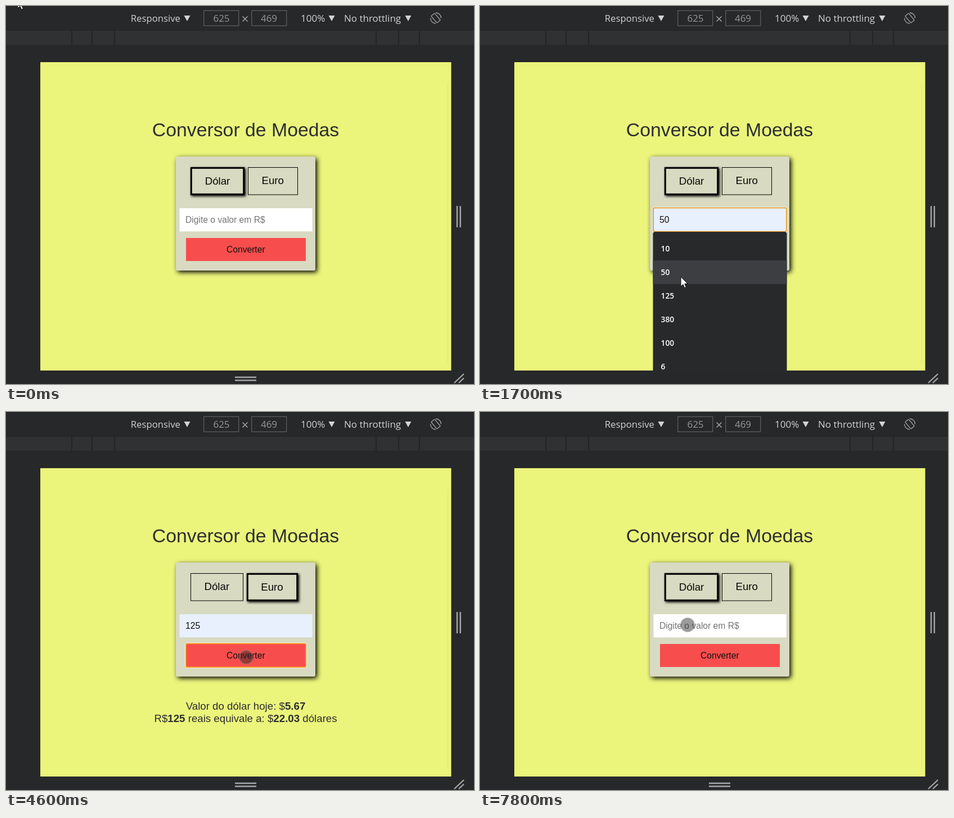
Recreate the animation shown at these times as an HTML page. Size 832 px wide and 673 px high, loop 8 s.

```html
<!DOCTYPE html>
<html lang="pt-BR">
<head>
<meta charset="utf-8">
<title>Conversor de Moedas</title>
<style>
  html, body { margin: 0; width: 100%; height: 100%; overflow: hidden; background: #272829; }
  svg { display: block; width: 832px; height: 673px; }
  text { white-space: pre; }
  .page { font-family: "Liberation Sans", Arial, sans-serif; fill: #2d2e31; }
  .ui { font-family: "Open Sans", "Noto Sans", sans-serif; fill: #d2d3d5; font-size: 17px; }
  .mid { text-anchor: middle; }
  .label { font-size: 18.7px; fill: #080808; }
  .small { font-size: 15.65px; fill: #111; }
  .result { font-size: 18.7px; }
  .result tspan { font-weight: bold; }
  .card { fill: #d8dac1; filter: drop-shadow(3px 3px 4.3px #000); }
  .option { fill: #d8dac1; stroke: #000; }
  .option.on { stroke-width: 3; filter: drop-shadow(2px 2px 2px #000); }
  .ring { fill: none; stroke: #e8981c; stroke-width: 1.6; }
  .glow { fill: none; stroke: #fff; stroke-opacity: .6; }
  .grip { stroke: #a6a7a9; stroke-width: 2.4; }
</style>
</head>
<body>
<svg viewBox="0 0 832 673">
  <defs>
    <clipPath id="viewport"><rect x="61" y="100" width="730.5" height="549"/></clipPath>
    <path id="arrowhead" d="M-5.5-5h11L0 5z" fill="#d2d3d5"/>
  </defs>

  <!-- device toolbar and ruler -->
  <rect width="832" height="673" fill="#272829"/>
  <rect width="832" height="1" fill="#1d1e1f"/>
  <rect y="43" width="832" height="26" fill="#303132"/>
  <path d="M0 43.5H832" stroke="#222324"/>
  <path d="M117 44v25M153 44v25M193 44v25M658 44v25M698 44v25M735 44v25" stroke="#242526" stroke-width="2"/>
  <g class="ui">
    <text x="221.8" y="28" font-size="16.7">Responsive</text>
    <text x="524" y="28" font-size="17">100%</text>
    <text x="601" y="28">No throttling</text>
    <g fill="#97989a" class="mid">
      <text x="383" y="28">625</text>
      <text x="467.5" y="28">469</text>
    </g>
  </g>
  <use href="#arrowhead" x="322" y="22"/>
  <use href="#arrowhead" x="579" y="22"/>
  <use href="#arrowhead" x="715" y="22"/>
  <g fill="none" stroke="#58595b" stroke-width="1.4">
    <rect x="351.7" y="8.2" width="62" height="27"/>
    <rect x="436.7" y="8.2" width="62" height="27"/>
  </g>
  <path d="M420.5 18.5l9 9M429.5 18.5l-9 9" stroke="#a2a3a5" stroke-width="1.5"/>
  <g transform="translate(764 21.5)" fill="none" stroke="#a2a3a5" stroke-width="1.3">
    <rect x="-4" y="-8" width="8" height="16" rx="1" transform="rotate(-40)"/>
    <path d="M0-9.5A9.5 9.5 0 0 1 9.5 0M0 9.5A9.5 9.5 0 0 1-9.5 0"/>
  </g>
  <path class="grip" d="M802 356v38M807.7 356v38M797 671l17-16M805 671l9-8.5"/>
  <path class="grip" id="bottomGrip" d="M407 661h38M407 666.5h38"/>

  <!-- emulated page -->
  <g clip-path="url(#viewport)">
    <rect x="61" y="100" width="731" height="549" fill="#ebf57b"/>
    <path id="scrollTrace" d="M785.5 138V636" stroke="#e3ed78" stroke-width="1.5"/>
    <g class="page">
      <text class="mid" x="426" y="232" font-size="33.8">Conversor de Moedas</text>
      <rect class="card" x="302" y="268" width="248" height="203" rx="3"/>
      <g id="dollarMode">
        <rect class="option" x="430.5" y="287.5" width="88" height="48.5"/>
        <rect class="option on" x="329.3" y="288.3" width="93.4" height="47"/>
        <text class="label mid" x="376" y="318">Dólar</text>
        <text class="label mid" x="474.2" y="316.5">Euro</text>
      </g>
      <g id="euroMode">
        <rect class="option" x="328.5" y="287.5" width="93" height="48.5"/>
        <rect class="option on" x="429.3" y="288.3" width="88.4" height="47"/>
        <text class="label mid" x="374.8" y="316.5">Dólar</text>
        <text class="label mid" x="473" y="318">Euro</text>
      </g>
      <rect id="field" x="308.5" y="360" width="236.2" height="41.3"/>
      <g id="fieldRing">
        <rect class="glow" x="306.7" y="358" width="239.6" height="45" rx="3.5"/>
        <rect class="ring" x="308.2" y="359.5" width="236.6" height="42" rx="2.5"/>
      </g>
      <text id="fieldText" class="small" x="319" y="385.6"></text>
      <path id="caret" stroke="#000" stroke-width="1.2"/>
      <rect x="320" y="413" width="213" height="41" fill="#f74e4d"/>
      <g id="buttonRing">
        <rect class="glow" x="318.5" y="410.8" width="216" height="45" rx="3.5"/>
        <rect class="ring" x="319.8" y="412.2" width="213.4" height="42.2" rx="2.5" style="stroke:#ffa51c"/>
      </g>
      <text class="small mid" x="426.3" y="438.6">Converter</text>
      <g id="dollarResult" class="result mid">
        <text x="426" y="530">Valor do dólar hoje: $<tspan>5.67</tspan></text>
        <text x="426" y="551.7">R$<tspan>125</tspan> reais equivale a: $<tspan>22.03</tspan> dólares</text>
      </g>
      <g id="euroResult" class="result mid">
        <text x="426" y="530">Valor do euro hoje: <tspan>€6.696</tspan></text>
        <text x="426" y="551.7"><tspan>R$125</tspan> reais equivale a: <tspan>€18.67</tspan> euros</text>
      </g>
    </g>
    <g id="popup" class="ui">
      <path d="M307.5 649V406q0-4 4-4h230q4 0 4 4V649z" fill="#28292b"/>
      <rect id="hover" x="307.5" width="238" height="42" fill="#3d3e41"/>
    </g>
    <g id="status" class="ui">
      <path d="M60 649V622H297.500q4 0 4 4V649z" fill="#303134"/>
      <text x="66" y="640" style="font-size:13.2px;fill:#bdc1c6">Aguardando api.exchangeratesapi.i...</text>
    </g>
  </g>

  <g id="touch">
    <circle r="12" fill="#222" fill-opacity=".5"/>
    <circle r="12" fill="none" stroke="#777" stroke-opacity=".4" stroke-width="2.4"/>
  </g>
  <path id="arrow" d="M0 0V17l4-3.700 2.600 6 2.800-1.200-2.600-5.800h5.500z" fill="#fff" stroke="#000" stroke-width=".9"/>
</svg>
<script>
const LOOP = 8000, STEP = 100;
const $ = id => document.getElementById(id);
const show = (id, on) => { $(id).style.display = on ? '' : 'none'; };

const suggestions = ['10', '50', '125', '380', '100', '6'];
const rowTop = i => 411 + 42 * i;
suggestions.forEach((value, i) => {
  const label = document.createElementNS('http://www.w3.org/2000/svg', 'text');
  label.textContent = value;
  label.setAttribute('x', 321.5);
  label.setAttribute('y', rowTop(i) + 26.2);
  label.style.cssText = 'font-size:13.8px;font-weight:600;fill:#fff';
  $('popup').append(label);
});

// Pointer trips: key points are [time, x, y]; the pointer is gone after `until`.
const trips = [
  { until: 5700, keys: [
    [0, 21, -13], [100, 75, 22], [200, 195, 122], [300, 330, 265], [400, 435, 375], [500, 473.500, 418],
    [600, 462, 424.500], [700, 432, 400], [800, 418.500, 384.500], [1200, 418.500, 384.500],
    [1300, 424, 393], [1500, 390, 450], [1800, 340.500, 498.500], [2200, 340.500, 498.500],
    [2400, 415, 455], [2500, 425, 443], [3400, 425, 443], [3800, 457, 318], [4000, 457, 318],
    [4300, 429.500, 429.500], [4400, 427.500, 436.500], [5200, 425.500, 437], [5600, 380.500, 326.500]] },
  { until: 6500, keys: [[6200, 425, 320], [6400, 118, 2]] },
  { until: 8000, keys: [[7600, 335, 165], [7700, 360, 310], [7800, 369, 379]] }
];

function pointerAt(t) {
  const trip = trips.find(({ keys, until }) => t >= keys[0][0] && t < until);
  if (!trip) return null;
  const next = trip.keys.findIndex(key => key[0] > t);
  if (next < 0) return trip.keys.at(-1).slice(1);
  const [t0, x0, y0] = trip.keys[next - 1], [t1, x1, y1] = trip.keys[next];
  const k = (t - t0) / (t1 - t0);
  return [x0 + (x1 - x0) * k, y0 + (y1 - y0) * k];
}

function draw(t) {
  const within = (from, to) => t >= from && t < to;
  const pointer = pointerAt(t);
  const popup = within(1300, 2100);
  const row = popup && pointer[1] > 411 ? Math.floor((pointer[1] - 411) / 42) : -1;
  const euro = within(4000, 7300);
  const value = within(2100, 7300) ? '125' : row >= 0 ? suggestions[row] : '';

  show('dollarMode', !euro);
  show('euroMode', euro);
  show('dollarResult', within(2900, 5000));
  show('euroResult', within(5000, 7300));
  show('fieldRing', within(1300, 2700));
  show('buttonRing', within(2700, 4000) || within(4600, 7300));
  show('popup', popup);
  show('bottomGrip', !popup);
  show('status', within(7200, 7600));
  show('scrollTrace', !within(7300, 7600));

  $('field').setAttribute('fill', value ? '#e8f0fe' : '#fff');
  $('fieldText').textContent = value || 'Digite o valor em R$';
  $('fieldText').style.fill = value ? '#111' : '#757575';
  show('caret', within(1300, 2700) && row < 0);
  $('caret').setAttribute('d', `M${value ? 346.5 : 320.5} 371.500v17.500`);

  show('hover', row >= 0);
  $('hover').setAttribute('y', rowTop(row));

  const native = pointer && (pointer[1] < 100 || row >= 0);
  show('arrow', pointer && native);
  show('touch', pointer && !native);
  if (pointer) {
    const id = native ? 'arrow' : 'touch';
    $(id).setAttribute('transform', `translate(${pointer})`);
  }
  $('touch').style.opacity = within(1000, 1100) ? 1 : .9;
}

function tick() {
  const t = performance.now() % LOOP;
  draw(Math.floor(t / STEP) * STEP);
  requestAnimationFrame(tick);
}
tick();
</script>
</body>
</html>
```
